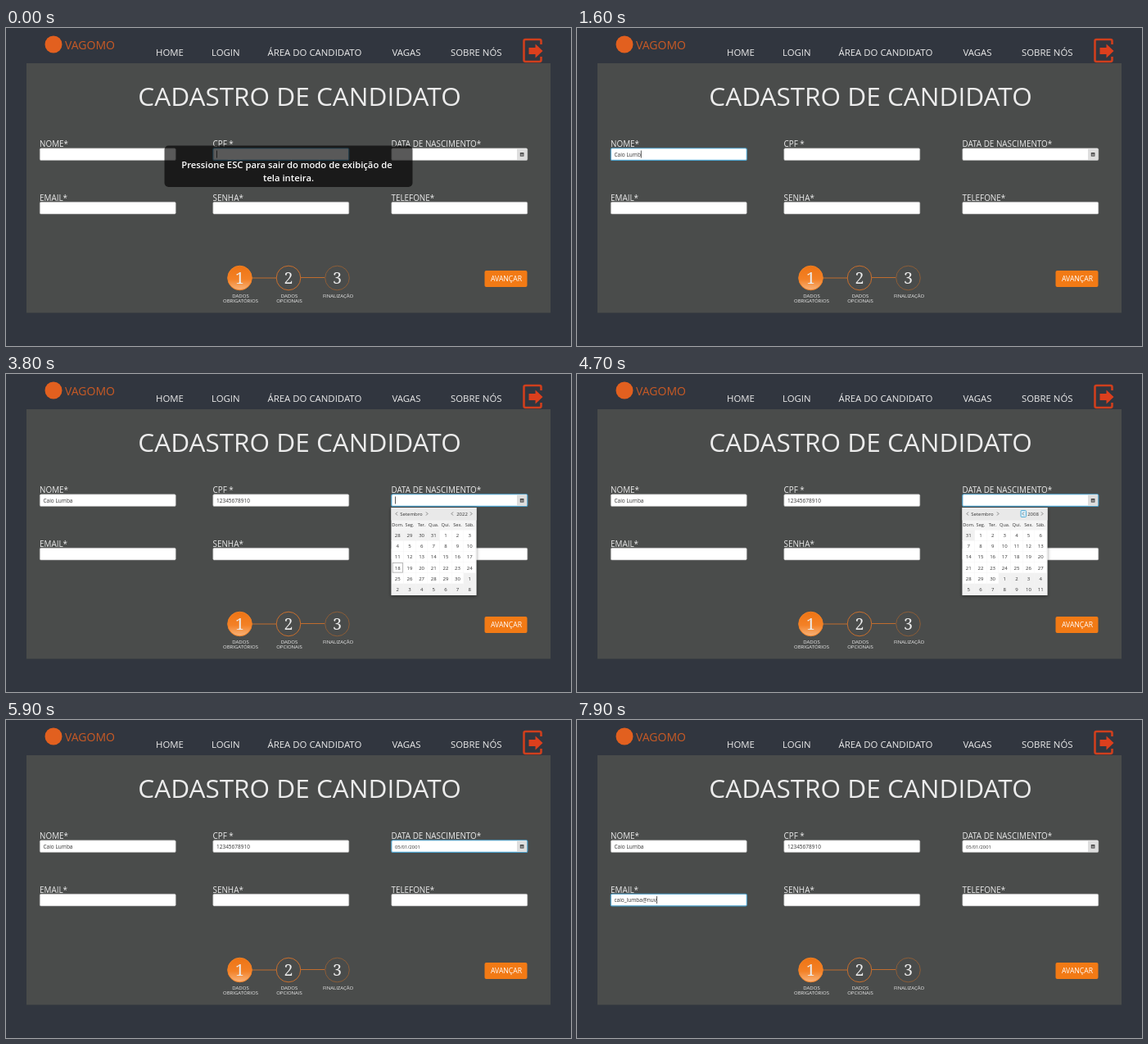
An HTML page for the animation above (8 s loop, 690 by 388 pixels).

```html
<!DOCTYPE html>
<html lang="pt-BR">
<head>
<meta charset="utf-8">
<title>Cadastro de candidato</title>
<style>
  html, body { margin: 0; width: 100%; height: 100%; overflow: hidden; background: #31363f; }
  svg { display: block; width: 690px; height: 388px; font-family: "Open Sans", "Noto Sans", sans-serif; }
  text { white-space: pre; }
  .mid { text-anchor: middle; }
  .white { fill: #ececec; }
  .nav { font-size: 11.4px; }
  .label { font-size: 9.9px; }
  .caption { font-size: 6px; }
  .digit { font: 19.5px "Noto Serif", serif; }
  .typed { font-size: 6.5px; fill: #333; }
  .calendar { font-size: 6px; fill: #333; }
</style>
</head>
<body>
<svg id="stage" viewBox="0 0 690 388">
  <defs>
    <linearGradient id="ball" x1="0" y1="0" x2="0" y2="1">
      <stop offset="0" stop-color="#ee7414"/>
      <stop offset=".55" stop-color="#f38126"/>
      <stop offset="1" stop-color="#f9b47c"/>
    </linearGradient>
    <filter id="shadow" x="-20%" y="-20%" width="140%" height="140%">
      <feDropShadow dx="0" dy="1" stdDeviation="2" flood-opacity=".45"/>
    </filter>
  </defs>
  <rect width="690" height="388" fill="#31363f"/>
  <rect x="25" y="43" width="640" height="304.500" fill="#4a4c4b"/>
  <circle cx="58" cy="20" r="10.500" fill="#e2601f"/>
  <text x="72" y="26" font-size="14" fill="#c95a25">VAGOMO</text>
  <g fill="none" stroke="#cf3f1d" stroke-width="2.600">
    <path d="M653.500 20V16q0-2-2-2H634.500q-2 0-2 2V39q0 2 2 2H651.500q2 0 2-2V35"/>
    <path d="M638.500 24h8v-4.500l9 8.500-9 8.500V32h-8z" fill="#dc3f1d" stroke="none"/>
  </g>
  <text x="358.500" y="95" class="mid white" font-size="31.500">CADASTRO DE CANDIDATO</text>
  <g id="form"></g>
  <g id="steps"></g>
  <rect x="584.500" y="296" width="52" height="20" rx="2" fill="#f27a15"/>
  <text x="611" y="309.300" class="mid" font-size="8.600" fill="#fff">AVANÇAR</text>
  <g id="calendar" class="calendar" filter="url(#shadow)"></g>
  <g id="notice">
    <rect x="193.500" y="143.500" width="303" height="50.500" rx="5" fill="#000" fill-opacity=".65"/>
    <g class="mid" font-size="11.250" font-weight="600" fill="#fff">
      <text x="343" y="171">Pressione ESC para sair do modo de exibição de</text>
      <text x="345" y="186.500">tela inteira.</text>
    </g>
  </g>
</svg>
<script>
const LOOP = 8000;
const byId = id => document.getElementById(id);
const text = (x, y, cls, s, extra = "") => `<text x="${x}" y="${y}" class="${cls}" ${extra}>${s}</text>`;
const rect = (x, y, w, h, extra) => `<rect x="${x}" y="${y}" width="${w}" height="${h}" ${extra}/>`;

// focus lists [from, to) intervals; typed(t) gives the number of characters entered so far.
const everyTenth = start => t => Math.floor((t - start) / 100) + 1;
const fields = [
  { label: "NOME*", x: 41, y: 146.5, value: "Caio Lumba", focus: [[200, 1900]], typed: everyTenth(800) },
  { label: "CPF *", x: 252.5, y: 146.5, value: "12345678910", focus: [[0, 200], [1900, 3400]], typed: everyTenth(2200) },
  { label: "DATA DE NASCIMENTO*", x: 470.5, y: 146.5, value: "05/01/2001", focus: [[3400, 6300]],
    typed: t => t >= 5800 ? 10 : 0, caretUntil: 4200, date: true },
  { label: "EMAIL*", x: 41, y: 212, value: "caio_lumba@nuv", focus: [[6300, LOOP]],
    typed: t => everyTenth(6500)(t) - (t >= 7300) },
  { label: "SENHA*", x: 252.5, y: 212 },
  { label: "TELEFONE*", x: 470.5, y: 212 },
];

const navItems = [["HOME", 183], ["LOGIN", 251], ["ÁREA DO CANDIDATO", 319.5], ["VAGAS", 471.5], ["SOBRE NÓS", 543]];
const calendarIcon = rect(624, 147.5, 12, 13.5, 'fill="#dedede"') +
  rect(627.8, 152, 4.6, 4.6, 'fill="#444"') + rect(628.6, 153.5, 3, 2.3, 'fill="#999"');

byId("form").innerHTML =
  navItems.map(([name, x]) => text(x, 34, "nav white", name)).join("") +
  fields.map(f => text(f.x, f.y - 1.5, "label white", f.label) +
    rect(f.x + .3, f.y + .3, 166, 14.6, 'rx="1.500" fill="#fff" stroke="#aaa" stroke-width=".600" class="box"') +
    (f.date ? calendarIcon : "") +
    text(f.x + 4.5, f.y + 10.2, "typed", "", f.date ? 'style="font-size:5.8px"' : "") +
    rect(f.x, f.y + 3, .7, 9, 'fill="#111" class="caret" visibility="hidden"')).join("");
["box", "typed", "caret"].forEach(part =>
  document.querySelectorAll("." + part).forEach((el, i) => fields[i][part + "El"] = el));

const step = (n, x, fill, stroke, lines) =>
  `<circle cx="${x}" cy="305" r="14.800" fill="${fill}" stroke="${stroke}"/>` +
  text(x, 312, "digit mid white", n) +
  lines.map((line, i) => text(x + 1, 328.6 + 6 * i, "caption mid white", line)).join("");
byId("steps").innerHTML =
  '<path d="M300 305H330M360 304.500H389" stroke="#c06c2e"/>' +
  step(1, 285.5, "url(#ball)", "#f08024", ["DADOS", "OBRIGATÓRIOS"]) +
  step(2, 345, "none", "#c96f2d", ["DADOS", "OPCIONAIS"]) +
  step(3, 404.5, "none", "#8c5d38", ["FINALIZAÇÃO"]);

const months = ["Janeiro", "Fevereiro", "Março", "Abril", "Maio", "Junho", "Julho", "Agosto", "Setembro"];
const weekdays = ["Dom.", "Seg.", "Ter.", "Qua.", "Qui.", "Sex.", "Sáb."];
const chevron = (x, dir) =>
  `<path d="M${x - dir} 168.500l${2 * dir} 2l${-2 * dir} 2" fill="none" stroke="#555" stroke-width=".700"/>`;

function calendarMarkup(year, month, ringX) {
  const column = i => 478.3 + 14.65 * i;
  let out = rect(470.5, 163, 104, 107, 'fill="#f4f4f4"') + rect(470.5, 163, 104, 15.5, 'fill="#e9e9e9"');
  if (ringX) out += rect(ringX - 3, 166.5, 6.5, 8, 'rx="1" fill="#d9eef8" stroke="#3aa0d0" stroke-width=".800"');
  out += text(495, 172.6, "mid", months[month]) + text(557, 172.6, "mid", year);
  out += chevron(477, -1) + chevron(514, 1) + chevron(545, -1) + chevron(568, 1);
  weekdays.forEach((name, i) => out += text(column(i), 186.3, "mid", name, 'style="font-size:5.6px"'));
  const offset = new Date(year, month, 1).getDay();
  for (let i = 0; i < 42; i++) {
    const day = new Date(year, month, 1 - offset + i);
    const x = column(i % 7), y = 197 + 13.1 * Math.floor(i / 7);
    const inside = day.getMonth() === month;
    const today = inside && year === 2022 && month === 8 && day.getDate() === 18;
    out += rect(x - 7.1, y - 6.4, 14.2, 12.7, `fill="${inside ? "#fff" : "#f1f1f1"}"`);
    if (today) out += rect(x - 6.2, y - 5.8, 12.4, 11.6, 'fill="none" stroke="#aaa" stroke-width=".800"');
    out += text(x, y + 2.2, "mid", day.getDate());
  }
  return out;
}

const clamp = (v, lo, hi) => Math.min(hi, Math.max(lo, v));
const clicks = (t, start, pace, count) => clamp(Math.floor((t - start) / pace), 0, count);
let shownCalendar = "";

function drawField(f, t) {
  if (!f.value) return;
  const focused = f.focus.some(([from, to]) => t >= from && t < to);
  f.boxEl.setAttribute("stroke", focused ? "#4a9fc9" : "#aaa");
  f.boxEl.setAttribute("stroke-width", focused ? 1.1 : .6);
  f.typedEl.textContent = f.value.slice(0, clamp(f.typed(t), 0, f.value.length));
  f.caretEl.setAttribute("x", f.x + 4.5 + f.typedEl.getComputedTextLength());
  f.caretEl.setAttribute("visibility", focused && t < (f.caretUntil || LOOP) ? "visible" : "hidden");
}

function drawCalendar(t) {
  const open = t >= 3600 && t < 5800;
  byId("calendar").setAttribute("visibility", open ? "visible" : "hidden");
  if (!open) return;
  const year = 2022 - clicks(t, 3800, 63, 21);
  const month = 8 - clicks(t, 5150, 55, 8);
  const ringX = month < 8 ? 477 : year < 2022 ? 545 : 0;
  const key = [year, month, ringX].join();
  if (key !== shownCalendar) byId("calendar").innerHTML = calendarMarkup(year, month, ringX);
  shownCalendar = key;
}

function draw() {
  const t = performance.now() % LOOP;
  fields.forEach(f => drawField(f, t));
  drawCalendar(t);
  byId("notice").setAttribute("opacity", clamp((1400 - t) / 600, 0, 1));
  requestAnimationFrame(draw);
}
draw();
</script>
</body>
</html>
```
